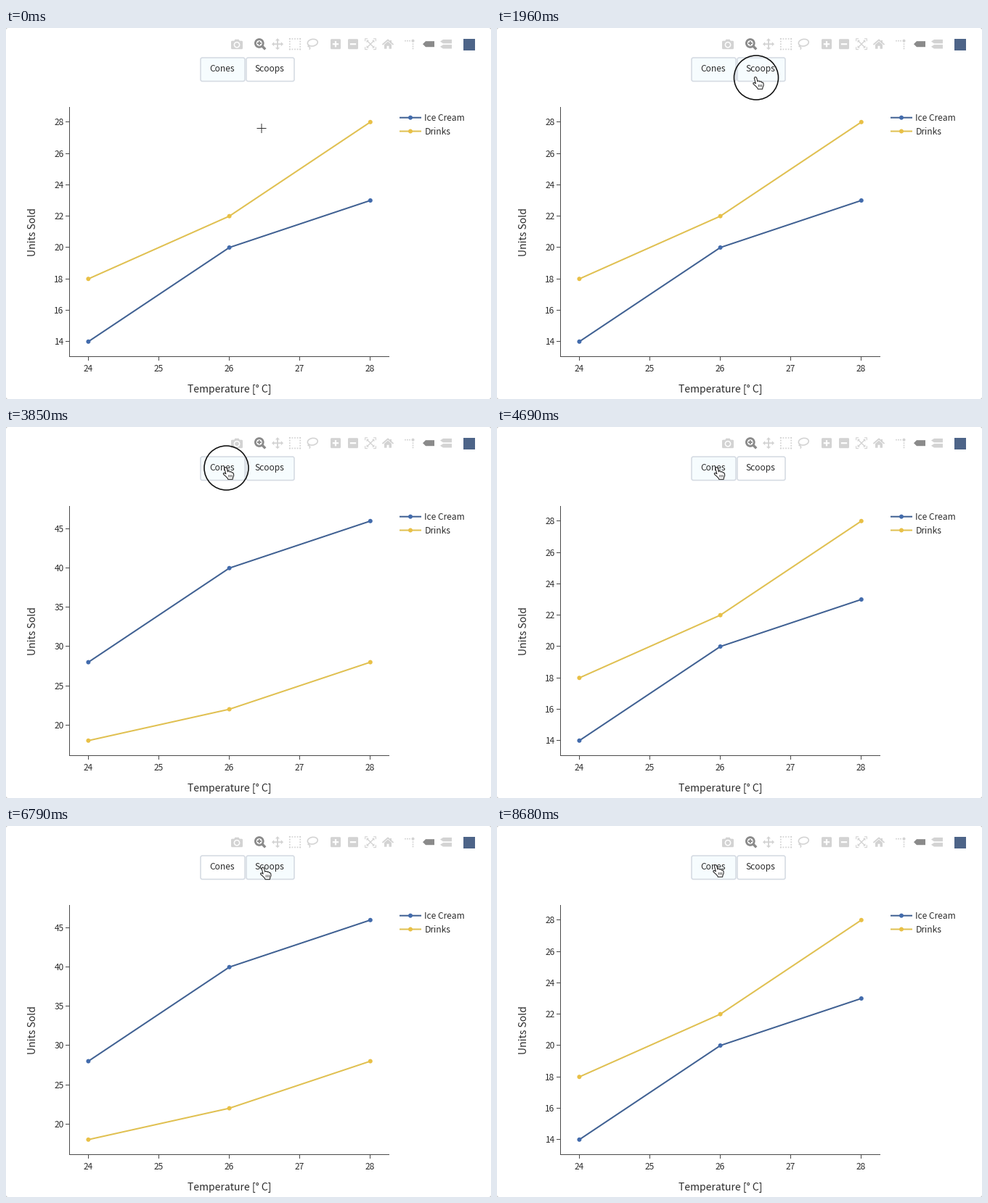
A matplotlib script for the animation above (8750 ms loop, 668 by 512 pixels).

```python
import numpy as np
import matplotlib.pyplot as plt
from matplotlib.animation import FuncAnimation
from matplotlib.patches import Circle, Ellipse, FancyBboxPatch, Polygon, Rectangle

W, H, DPI = 668, 512, 100
STEP, LOOP = 70, 8750
PT = 72 / DPI

plt.rcParams["font.family"] = "Noto Sans CJK JP"
plt.rcParams["toolbar"] = "None"

INK, AXIS = "#2c2c2c", "#4a4a4a"
BLUE_LINE, BLUE_DOT = "#3f6092", "#426bac"
GOLD_LINE, GOLD_DOT = "#e0c050", "#e9c046"
PALE, DARK = "#d3d3d3", "#8a8a8a"
TINT = "#f6fcfe"

CLICKS = [1890, 3780, 5600, 7630]
SWITCH_DELAY, RING_TIME = 140, 210

# Pointer tip: time, x, y
PATH = [(0, 352, 138.5), (880, 352, 138.5), (1400, 353, 73), (1750, 356, 68),
        (2660, 356, 68), (3220, 302.5, 56), (4690, 302.5, 56),
        (5110, 363, 58), (6610, 363, 58), (7350, 301, 54), (LOOP, 301, 54)]

fig = plt.figure(figsize=(W / DPI, H / DPI), dpi=DPI, facecolor="#c4c4c4")
ax = fig.add_axes([0, 0, 1, 1])
ax.set_xlim(0, W)
ax.set_ylim(H, 0)
ax.axis("off")


def line(xs, ys, color, width=1.0, z=2):
    return ax.plot(xs, ys, color=color, lw=width * PT, zorder=z, snap=False,
                   solid_capstyle="butt")[0]


def add(patch, z=2):
    patch.set_zorder(z)
    return ax.add_patch(patch)


def rounded(x0, y0, x1, y1, r, fill, edge="none", width=0.0, z=2):
    return add(FancyBboxPatch((x0, y0), x1 - x0, y1 - y0, fc=fill, ec=edge, lw=width * PT,
                              boxstyle=f"round,pad=0,rounding_size={r}"), z)


def poly(points, color, z=2):
    return add(Polygon(points, fc=color, ec="none"), z)


def disc(x, y, r, color, z=2):
    return add(Circle((x, y), r, fc=color, ec="none"), z)


def dot_square(x, y, size=1.7):
    add(Rectangle((x - size / 2, y - size / 2), size, size, fc=PALE, ec="none", snap=False))


def ring(x, y, r, color, width, z=2):
    return add(Circle((x, y), r, fc="none", ec=color, lw=width * PT), z)


def text(x, y, s, size=12, ha="center", **kw):
    return ax.text(x, y, s, fontsize=size * PT, color=INK, ha=ha, va="baseline",
                   zorder=4, **kw)


# ---- chart ----

def crisp(v):
    return np.floor(v) + 0.5


def px(v):
    return 113.4 + (np.asarray(v) - 24) * 97.1


def series(xs, ys, stroke, dot):
    return [line(xs, ys, stroke, 2, z=2.5)] + [disc(x, y, 3, dot, 3) for x, y in zip(xs, ys)]


def chart(cream, drinks, ticks):
    lo, hi = min(cream + drinks), max(cream + drinks)

    def py(v):
        return 432.8 - 303 * (np.asarray(v) - lo) / (hi - lo)

    xs = px([24, 26, 28])
    parts = series(xs, py(drinks), GOLD_LINE, GOLD_DOT)
    parts += series(xs, py(cream), BLUE_LINE, BLUE_DOT)
    for v in ticks:
        y = crisp(py(v))
        parts.append(line([82, 87], [y, y], AXIS))
        parts.append(text(79.7, y + 4.7, str(v), ha="right"))
    return parts


def frame_and_legend():
    line([87.5, 87.5], [109, 454], AXIS)
    line([87, 528], [453.5, 453.5], AXIS)
    for v in range(24, 29):
        x = crisp(px(v))
        line([x, x], [454, 459], AXIS)
        text(x, 474.3, str(v))
    text(307.7, 503.3, "Temperature [° C]", 14)
    text(40.8, 281.3, "Units Sold", 14, rotation=90, rotation_mode="anchor")
    for y, stroke, dot, label in [(123.7, BLUE_LINE, BLUE_DOT, "Ice Cream"),
                                  (142.5, GOLD_LINE, GOLD_DOT, "Drinks")]:
        line([542, 572], [y, y], stroke, 2)
        disc(557, y, 3, dot, 3)
        text(576.3, y + 4.5, label, ha="left")


# ---- toolbar ----

def camera(x, y):
    rounded(x - 8, y - 4.5, x + 8, y + 7, 1.5, PALE)
    poly([(x - 4, y - 4), (x - 2.5, y - 6.5), (x + 2.5, y - 6.5), (x + 4, y - 4)], PALE)
    ring(x, y + 1, 3.6, "white", 1.5, 3)


def magnifier(x, y):
    ring(x - 1.2, y - 1.2, 5.4, DARK, 2.8)
    line([x + 2.5, x + 7.2], [y + 2.5, y + 7.2], DARK, 3.4)
    line([x - 4, x + 1.6], [y - 1.2, y - 1.2], DARK, 2)
    line([x - 1.2, x - 1.2], [y - 4, y + 1.6], DARK, 2)


def move_arrows(x, y):
    line([x - 6, x + 6], [y, y], PALE, 1.8)
    line([x, x], [y - 6, y + 6], PALE, 1.8)
    for dx, dy in [(1, 0), (-1, 0), (0, 1), (0, -1)]:
        tip = (x + 8 * dx, y + 8 * dy)
        bx, by = x + 4.8 * dx, y + 4.8 * dy
        poly([tip, (bx - 3 * dy, by + 3 * dx), (bx + 3 * dy, by - 3 * dx)], PALE)


def dashed_box(x, y):
    for d in (-7.2, 7.2):
        for s in np.linspace(-7.2, 7.2, 5):
            dot_square(x + s, y + d)
            dot_square(x + d, y + s)


def lasso(x, y):
    add(Ellipse((x + 0.3, y - 2), 14, 9.5, angle=-10, fc="none", ec=PALE, lw=1.6 * PT))
    line([x - 5, x - 6, x - 4, x - 3.2, x - 4.2],
         [y + 1.5, y + 3, y + 4, y + 5.5, y + 7.5], PALE, 1.5)


def zoom_key(x, y, plus):
    rounded(x - 7, y - 7, x + 7, y + 7, 1.5, PALE)
    line([x - 4.2, x + 4.2], [y, y], "white", 2.2, 3)
    if plus:
        line([x, x], [y - 4.2, y + 4.2], "white", 2.2, 3)


def autoscale(x, y):
    for sx in (-1, 1):
        for sy in (-1, 1):
            line([x + 4 * sx, x + 7.4 * sx, x + 7.4 * sx],
                 [y + 7.4 * sy, y + 7.4 * sy, y + 4 * sy], PALE, 1.1)
            poly([(x + 5.4 * sx, y + 5.4 * sy), (x + 2 * sx, y + 5.4 * sy),
                  (x + 5.4 * sx, y + 2 * sy)], PALE)
        line([x - 4, x + 4], [y - 4 * sx, y + 4 * sx], PALE, 1.3)


def house(x, y):
    line([x - 7.5, x, x + 7.5], [y + 0.8, y - 5.8, y + 0.8], PALE, 1.8)
    poly([(x - 5, y + 0.8), (x, y - 3.6), (x + 5, y + 0.8), (x + 5, y + 6.5), (x + 1.5, y + 6.5),
          (x + 1.5, y + 2.5), (x - 1.5, y + 2.5), (x - 1.5, y + 6.5), (x - 5, y + 6.5)], PALE)
    add(Rectangle((x + 3.2, y - 5.5), 2, 4, fc=PALE, ec="none"))


def spikes(x, y):
    for s in (-6, -3, 0):
        dot_square(x + s, y - 4.5)
    for s in (0, 3.2, 6.2):
        dot_square(x + 4.5, y + s)
    disc(x + 4.5, y - 4.5, 2, PALE)


def tag(x, y, half, color):
    poly([(x - 8, y), (x - 4, y - half), (x + 8, y - half), (x + 8, y + half),
          (x - 4, y + half)], color)


def toolbar(y=22.2):
    camera(318, y)
    magnifier(350, y)
    move_arrows(374, y)
    dashed_box(398, y)
    lasso(422, y)
    zoom_key(454, y, True)
    zoom_key(478, y, False)
    autoscale(502, y)
    house(526, y)
    spikes(556, y)
    tag(582, y, 4, DARK)
    tag(606, y - 3.6, 2.7, PALE)
    tag(606, y + 3.6, 2.7, PALE)
    add(Rectangle((630, 14.5), 16, 16, fc="#4d6488", ec="none"))
    return add(Rectangle((300, 8), 352, 28, fc="white", ec="none"), 5)


# ---- buttons and pointer ----

class Button:
    def __init__(self, x0, x1, label):
        self.x0, self.x1 = x0, x1
        self.box = rounded(x0, 41, x1, 73.5, 2.5, "white", "#d5dbe3", 1.6)
        text((x0 + x1) / 2 - 1.3, 60.3, label)

    def update(self, active, x, y):
        hover = self.x0 <= x <= self.x1 and 41 <= y <= 74
        self.box.set_facecolor(TINT if active or hover else "white")


HAND = 0.93 * np.array([
    (-1.8, 1.5), (-1, -0.3), (0.8, -0.3), (2, 1.5), (3, 6.2), (4, 5.4),
    (5.8, 5.6), (6.4, 6.6), (7.6, 6), (9, 6.6), (9.4, 7.8), (10.8, 7.6),
    (11.8, 9), (12, 12), (10.8, 15), (10.3, 17.5), (3.5, 17.5), (3, 16),
    (0, 12.8), (-3.2, 10), (-3.4, 8.4), (-1.6, 8), (0.4, 9.4)])


class Pointer:
    def __init__(self):
        self.hand = add(Polygon(HAND, fc="white", ec="#2a2a2a", lw=1.1 * PT,
                                joinstyle="round"), 9)
        self.folds = [line([], [], "#2a2a2a", 0.8, 10) for _ in range(3)]
        self.cross = [line([], [], "#333333", 1, 9) for _ in range(2)]

    def update(self, x, y):
        crossing = y > 108
        self.hand.set_visible(not crossing)
        self.hand.set_xy(HAND + (x, y))
        for k, fold in enumerate(self.folds):
            fx = x + 4.4 + 2.1 * k
            fold.set_data([fx, fx], [y + 10, y + 13.4])
            fold.set_visible(not crossing)
        self.cross[0].set_data([x - 6.5, x + 6.5], [y, y])
        self.cross[1].set_data([x, x], [y - 6.5, y + 6.5])
        for bar in self.cross:
            bar.set_visible(crossing)


def pointer_at(t):
    for (t0, x0, y0), (t1, x1, y1) in zip(PATH, PATH[1:]):
        if t <= t1:
            u = (t - t0) / (t1 - t0)
            u = u * u * (3 - 2 * u)
            return x0 + (x1 - x0) * u, y0 + (y1 - y0) * u
    return PATH[-1][1:]


rounded(0, 0, W, H, 3, "white", z=0)
frame_and_legend()
charts = [chart([14, 20, 23], [18, 22, 28], range(14, 29, 2)),
          chart([28, 40, 46], [18, 22, 28], range(20, 46, 5))]
veil = toolbar()
buttons = [Button(268, 329, "Cones"), Button(331, 397, "Scoops")]
click_ring = ring(0, 0, 30.5, "#111111", 1.6, 8)
pointer = Pointer()


def update(i):
    t = i * STEP
    x, y = pointer_at(t)
    mode = sum(t >= c + SWITCH_DELAY for c in CLICKS) % 2
    for k, (parts, button) in enumerate(zip(charts, buttons)):
        for part in parts:
            part.set_visible(k == mode)
        button.update(k == mode, x, y)
    veil.set_alpha(float(np.interp(t, [980, 1260, 1470, 1750], [0, 1, 1, 0])))
    click_ring.set_visible(any(c <= t < c + RING_TIME for c in CLICKS))
    click_ring.center = (x + 1, y + 0.5)
    pointer.update(x, y)
    return []


anim = FuncAnimation(fig, update, frames=LOOP // STEP, interval=STEP,
                     init_func=lambda: update(0), repeat=True, repeat_delay=0)
plt.show()
```
